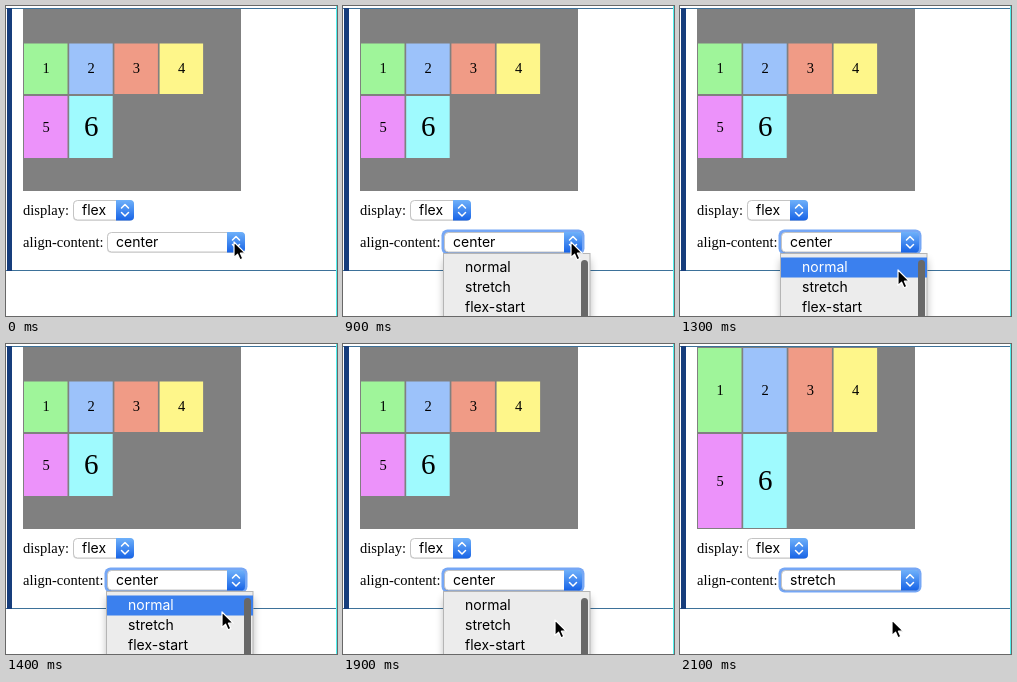
An HTML page that plays this animation: 331 by 310 pixels, repeating every 3 s.

```html
<!DOCTYPE html>
<html lang="en">
<head>
<meta charset="utf-8">
<title>align-content demo</title>
<style>
html, body { margin: 0; width: 100%; height: 100%; overflow: hidden; background: #fff; }
svg { display: block; width: 331px; height: 310px; }
.serif { font-family: "Liberation Serif", serif; font-size: 14.5px; }
.ui { font-family: Inter, sans-serif; font-size: 14px; }
.mid { text-anchor: middle; }
</style>
</head>
<body>
<svg id="stage" viewBox="0 0 331 310">
  <defs>
    <linearGradient id="cap" x2="0" y2="1">
      <stop offset="0" stop-color="#6fb1fa"/>
      <stop offset="1" stop-color="#1763e6"/>
    </linearGradient>
    <filter id="soft" x="-20%" y="-20%" width="140%" height="140%">
      <feGaussianBlur stdDeviation="4"/>
    </filter>
  </defs>
</svg>
<script>
const LOOP = 3000, STEP = 100;
const NS = "http://www.w3.org/2000/svg";
const stage = document.getElementById("stage");

function add(tag, attrs, parent = stage, text) {
  const el = document.createElementNS(NS, tag);
  set(el, attrs);
  if (text) el.textContent = text;
  parent.appendChild(el);
  return el;
}
function set(el, attrs) {
  for (const key in attrs) el.setAttribute(key, attrs[key]);
}
function rect(x, y, width, height, fill, extra, parent) {
  return add("rect", { x, y, width, height, fill, ...extra }, parent);
}
function label(x, y, text, cls, parent) {
  return add("text", { x, y, class: cls }, parent, text);
}
function show(el, on) {
  el.style.display = on ? "" : "none";
}

// Page frame
rect(0, 2, 331, 1, "#3d7199");
rect(0, 264, 331, 1, "#3d7199");
rect(1, 2, 5, 263, "#163d7c");
rect(330, 0, 1, 310, "#50f0ee");

// Flex container
rect(17, 3, 218, 182, "#808080");
const colors = ["#9ff59a", "#9cc2fa", "#f09b86", "#fef68a", "#ec92fa", "#9ffafe"];
const items = colors.map((fill, i) => {
  const col = i % 4, big = i === 5;
  const x = 18 + col * 45.2;
  const box = rect(x, 0, 43.5, 0, fill);
  const text = label(x + 22, 0, String(i + 1), "serif mid");
  if (big) text.style.fontSize = "29px";
  return { box, text, row: i < 4 ? 0 : 1, drop: big ? 9.5 : 5 };
});

function layout(rows) {
  for (const { box, text, row, drop } of items) {
    const [y, height] = rows[row];
    set(box, { y, height });
    set(text, { y: y + height / 2 + drop - 0.5 });
  }
}
const CENTER = [[37.5, 50.5], [90, 62]];
const STRETCH = [[4, 84], [90, 94]];

// Form controls
function select(x, y, w, text) {
  rect(x, y + 0.8, w, 20, "#000", { rx: 4, opacity: 0.14 });
  rect(x + 0.5, y + 0.5, w - 1, 19.5, "#fff", { rx: 4, stroke: "#c4c4c4" });
  const r = x + w;
  add("path", { d: `M${r - 18} ${y}h14a4 4 0 0 1 4 4v12.5a4 4 0 0 1-4 4h-14z`, fill: "url(#cap)" });
  add("path", {
    d: `M${r - 12.5} ${y + 8}l3.5-3.5 3.5 3.5M${r - 12.5} ${y + 12.5}l3.5 3.5 3.5-3.5`,
    fill: "none", stroke: "#fff", "stroke-width": 1.5,
    "stroke-linecap": "round", "stroke-linejoin": "round"
  });
  return label(x + 9, y + 15, text, "ui");
}

label(17, 209, "display:", "serif");
select(67, 194, 61, "flex");
label(17, 241, "align-content:", "serif");
const ring = rect(99.5, 224.5, 140.5, 23, "#76a7f5", { rx: 6 });
const value = select(101, 226, 138, "center");

// Drop-down menu
const menu = add("g", {});
rect(101, 254, 146, 70, "#000", { opacity: 0.3, filter: "url(#soft)" }, menu);
rect(100.5, 247.5, 146.5, 80, "#ececec", { stroke: "#b5b5b5" }, menu);
const bar = rect(101, 0, 146, 20, "#3b80ee", {}, menu);
const options = ["normal", "stretch", "flex-start"].map((name, i) =>
  label(122, 266 + i * 20, name, "ui", menu));
rect(238, 254, 7, 70, "#686868", { rx: 3.5 }, menu);

function highlight(index) {
  show(bar, index >= 0);
  set(bar, { y: 251.5 + Math.max(index, 0) * 20 });
  options.forEach((el, i) => set(el, { fill: i === index ? "#fff" : "#000" }));
}

// Pointer
const pointer = add("path", {
  d: "M0 0V15.5L3.6 12.2 6 17.8 8.8 16.6 6.4 11.2H11.2Z",
  fill: "#000", stroke: "#fff", "stroke-width": 1.2, "stroke-linejoin": "round"
});
const path = [[1000, 228, 236], [1300, 218, 264], [1600, 212, 276]];

function pointerAt(t) {
  if (t <= path[0][0]) return path[0].slice(1);
  for (let i = 1; i < path.length; i++) {
    const [t0, x0, y0] = path[i - 1], [t1, x1, y1] = path[i];
    if (t <= t1) {
      const k = (t - t0) / (t1 - t0);
      return [x0 + (x1 - x0) * k, y0 + (y1 - y0) * k];
    }
  }
  return path[path.length - 1].slice(1);
}

function draw(time) {
  const t = Math.floor((time % LOOP) / STEP) * STEP;
  const done = t >= 2100;
  layout(done ? STRETCH : CENTER);
  value.textContent = done ? "stretch" : "center";

  // The focus ring shrinks onto the control
  const grow = t === 100 ? 1.5 : 0;
  show(ring, t >= 100);
  set(ring, {
    x: 98.5 - grow, y: 223.5 - grow,
    width: 143 + grow * 2, height: 25 + grow * 2,
    opacity: grow ? 0.6 : 1
  });

  const [x, y] = pointerAt(t);
  set(pointer, { transform: `translate(${x} ${y})` });

  // The chosen row blinks once before the menu closes
  show(menu, t >= 900 && !done);
  highlight(y < 251 || t === 1900 ? -1 : y < 272 ? 0 : 1);
}

function tick() {
  draw(performance.now());
  requestAnimationFrame(tick);
}
draw(0);
tick();
</script>
</body>
</html>
```
